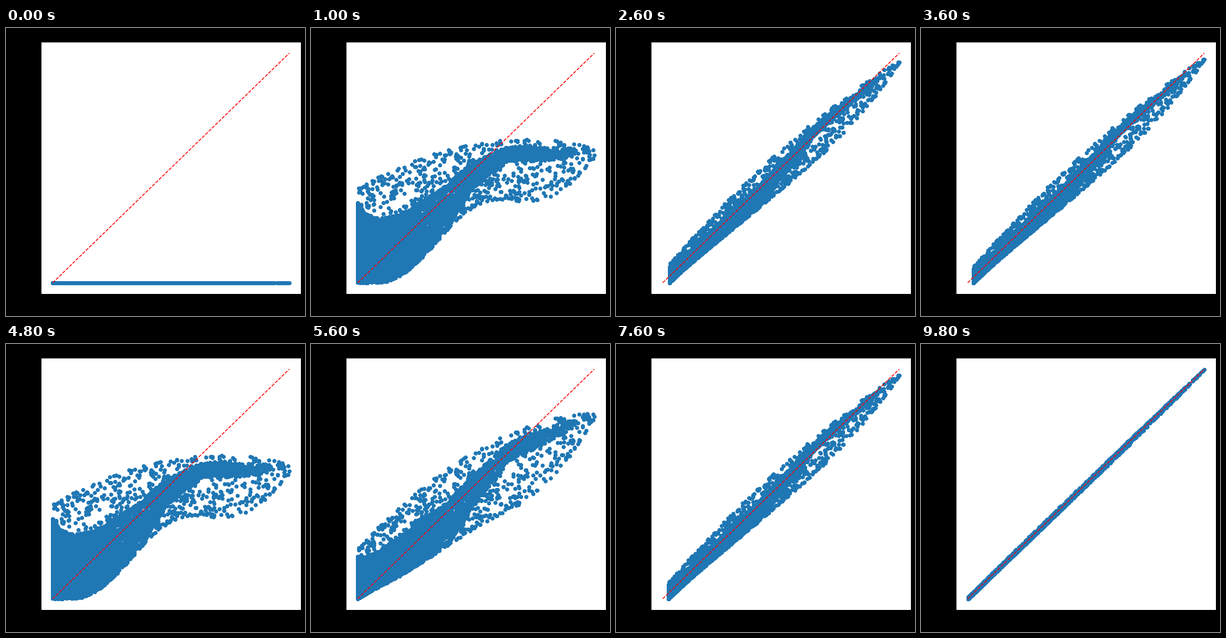
Animation of 513x496 px, one loop 10000 ms. Source, as a matplotlib script:

```python
import numpy as np
import matplotlib.pyplot as plt
from matplotlib.animation import FuncAnimation

W, H, DPI = 513, 496, 72
FRAMES, STEP_MS = 50, 200
GROW = 5  # frames the cloud needs to rise from zero

# (frame, spread) turning points; spread 0 is a perfect fit
KEYS = [(0, .41), (GROW, .41), (9, .21), (15, .015), (18, .07), (24, .41),
        (30, .12), (32, .11), (36, .02), (38, .07), (39, .07), (49, .008)]

rng = np.random.default_rng(7)
N_CORE, N_EDGE, N_SPARSE = 4500, 450, 950


def core_share(x, q):
    """Relative height of the dense band, which thins out to the right."""
    thin = np.clip((x - .38) / .25, 0, 1)
    low = .65 * thin
    high = .57 + .28 * np.exp(-x / .05) + .31 * thin
    return low + q * (high - low)


x_core = np.concatenate([rng.beta(.7, 2.2, N_CORE), np.zeros(N_EDGE)])
x_sparse = np.append(rng.beta(.9, 1.3, N_SPARSE), [0, 1])
x = np.concatenate([x_core, x_sparse])
share = np.concatenate([core_share(x_core, rng.random(x_core.size)),
                        rng.beta(.75, .85, x_sparse.size)])


def outline(b):
    """Lower and upper edge of the cloud for spread b."""
    top_end = min(1, 1.06 - 1.15 * b)
    bulge = b * (1 - 1.8 * b)
    sag = 1.2 * b * (1 - 2.4 * b)
    high = b + (top_end - b) * x + bulge * 4 * x * (1 - x)
    low = ((top_end - .1 * b) * x - sag * 6.75 * x**2 * (1 - x)
           - .4 * b**2 * np.sin(3 * np.pi * x))
    return np.maximum(low, 0), high


def cloud(frame):
    b = np.interp(frame, *zip(*KEYS))
    low, high = outline(b)
    y = min(1, frame / GROW) * (low + share * (high - low))
    offset = .35 * max(0, min(b, .21 - b))
    return np.column_stack([x + (1 - x) * offset, y])


fig = plt.figure(figsize=(W / DPI, H / DPI), dpi=DPI, facecolor="black")
left, top, width, height = 59.9, 23.6, 446.4, 434.88
ax = fig.add_axes([left / W, 1 - (top + height) / H, width / W, height / H])
ax.set(xlim=(-.05, 1.05), ylim=(-.05, 1.05), xticks=[], yticks=[])

dots = ax.scatter(x, np.zeros_like(x), s=36, color="tab:blue")
ax.plot([0, 1], [0, 1], "--", color="red", lw=1.5)


def update(frame):
    dots.set_offsets(cloud(frame))
    return (dots,)


anim = FuncAnimation(fig, update, frames=FRAMES, interval=STEP_MS,
                     repeat=True, repeat_delay=0, blit=False)
plt.show()
```
